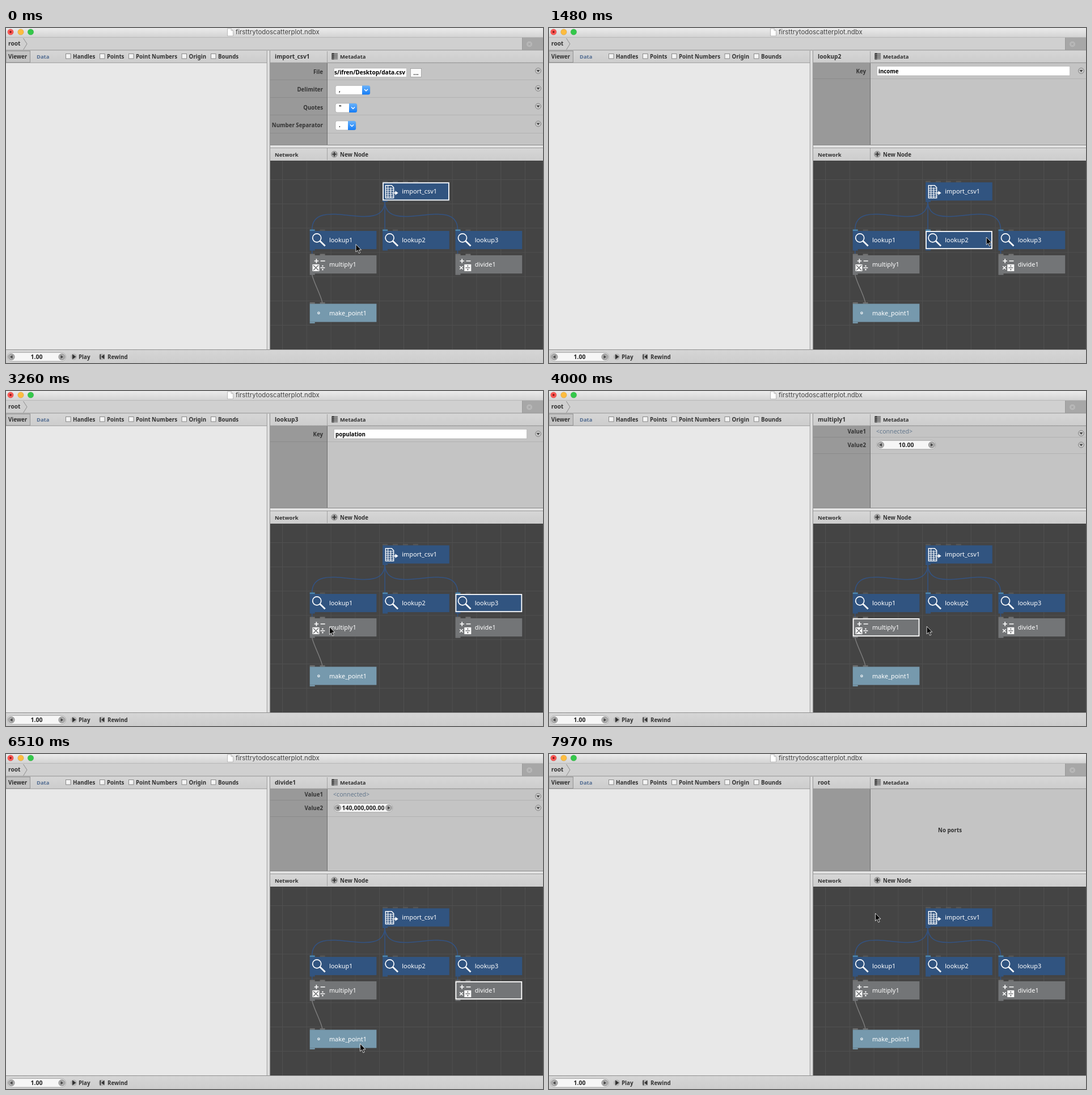
An HTML page for the animation above (8000 ms loop, 947 by 591 pixels).

```html
<!DOCTYPE html>
<html lang="en">
<head>
<meta charset="utf-8">
<title>Node editor</title>
<style>
html, body { margin: 0; width: 100%; height: 100%; overflow: hidden; background: #d0d0d0; }
svg { display: block; width: 947px; height: 591px; }
text { font-family: "Noto Sans", "Open Sans", sans-serif; white-space: pre; }
</style>
</head>
<body>
<svg id="stage" viewBox="0 0 947 591" xmlns="http://www.w3.org/2000/svg"></svg>
<script>
const LOOP = 8000;
const CELL = 42.8;
const NODE_W = 117.7;
const NODE_H = 32.1;

// Drawing helpers
const rect = (x, y, w, h, fill, extra = '') =>
  `<rect x="${x}" y="${y}" width="${w}" height="${h}" fill="${fill}" ${extra}/>`;
const line = (x1, y1, x2, y2, color, width = 1) =>
  `<path d="M${x1} ${y1}L${x2} ${y2}" stroke="${color}" stroke-width="${width}" fill="none"/>`;
const path = (d, fill, extra = '') => `<path d="${d}" fill="${fill}" ${extra}/>`;
const circle = (x, y, r, fill, extra = '') =>
  `<circle cx="${x}" cy="${y}" r="${r}" fill="${fill}" ${extra}/>`;
const stroke = (color, width) => `stroke="${color}" stroke-width="${width}"`;
const text = (x, y, value, { size = 9.7, fill = '#303030', weight = 600, anchor = 'start', extra = '' } = {}) => {
  const safe = value.replace(/</g, '&lt;').replace(/>/g, '&gt;');
  return `<text x="${x}" y="${y}" font-size="${size}" font-weight="${weight}" fill="${fill}" text-anchor="${anchor}" ${extra}>${safe}</text>`;
};
const gradient = (id, top, bottom) =>
  `<linearGradient id="${id}" x2="0" y2="1"><stop stop-color="${top}"/><stop offset="1" stop-color="${bottom}"/></linearGradient>`;

// Nodes sit on a grid, three cells apart per column
const column = i => 535.7 + i * 3 * CELL;
const BLUE = '#315480', GRAY = '#737577', TEAL = '#4d86ac', DIM = '#555', PALE = '#707070';
const nodes = {
  import_csv1: { x: column(1), y: 272.3, color: BLUE, icon: 'table', inputs: [DIM, DIM, DIM, DIM] },
  lookup1: { x: column(0), y: 358, color: BLUE, icon: 'lens', inputs: [TEAL, DIM] },
  lookup2: { x: column(1), y: 358, color: BLUE, icon: 'lens', inputs: [TEAL, DIM] },
  lookup3: { x: column(2), y: 358, color: BLUE, icon: 'lens', inputs: [TEAL, DIM] },
  multiply1: { x: column(0), y: 401, color: GRAY, icon: 'times', inputs: [PALE, PALE] },
  divide1: { x: column(2), y: 401, color: GRAY, icon: 'over', inputs: [PALE, PALE] },
  make_point1: { x: column(0), y: 486.5, color: '#7699ad', icon: 'dot', inputs: [PALE, PALE] }
};

// Icons are relative to the node's top left corner
const plusMinus = path('M8 10H15.500M11.700 6.200V13.800M19 10H27', 'none', stroke('#fff', 1.7));
const divide = (x, y, color) => line(x - 4, y, x + 4, y, color, 1.5) +
  circle(x, y - 3.3, 1.2, color) + circle(x, y + 3.3, 1.2, color);
const cross = (x, y, r, color, width) =>
  path(`M${x - r} ${y - r}l${2 * r} ${2 * r}m0 ${-2 * r}l${-2 * r} ${2 * r}`, 'none', stroke(color, width));
const icons = {
  table: () => path('M5.300 5.500H16L19.500 9V27.500H5.300Z', 'none', stroke('#fff', 1.5)) +
    path('M5 10.500H19M5 14H19M5 17.500H19M5 21H19M5 24.500H19M9.500 5.500V27.500M14.300 9V27.500', 'none', stroke('#fff', 1.1)) +
    path('M17 17.500H22V14.500L28 18.700L22 23V20H17Z', '#fff', stroke(BLUE, .6)),
  lens: () => circle(12.5, 12.3, 7.5, 'none', stroke('#fff', 1.7)) +
    path('M18 17.800L27 26.500', 'none', stroke('#fff', 2.8)),
  times: color => plusMinus + rect(4.8, 16, 12, 12, '#fff') + cross(10.8, 22, 4.5, color, 1.6) + divide(22.7, 22, '#fff'),
  over: color => plusMinus + cross(10.5, 22, 2.8, '#fff', 1.5) + rect(15.8, 16, 12, 12, '#fff') + divide(21.8, 22, color),
  dot: () => circle(15.7, 16.2, 1.7, 'none', stroke('#fff', 1.1))
};

function drawNode([name, n]) {
  const inputs = n.inputs.map((color, i) => rect(i * 17.9, -2.6, 9, 2.6, color)).join('');
  return `<g transform="translate(${n.x} ${n.y})">${inputs}` +
    rect(0, NODE_H, 9, 2.5, n.color) + rect(0, 0, NODE_W, NODE_H, n.color) +
    icons[n.icon](n.color) +
    text(34.2, 20, name, { size: 10.9, weight: 400, fill: '#fff' }) + '</g>';
}

function link(x1, y1, x2, y2, color) {
  const bend = Math.abs(x2 - x1) / 2;
  return path(`M${x1} ${y1}C${x1} ${y1 + bend} ${x2} ${y2 - bend} ${x2} ${y2}`, 'none', stroke(color, 1.5));
}

function drawNetwork() {
  const blue = '#335383';
  let grid = '';
  for (let i = 0; i < 11; i++) grid += line(487.5 + i * CELL, 235, 487.5 + i * CELL, 567, '#505050');
  for (let i = 0; i < 7; i++) grid += line(466, 267.5 + i * CELL, 947, 267.5 + i * CELL, '#505050');
  return rect(466, 234, 481, 333, '#444') + grid +
    [0, 1, 2].map(i => link(column(1) + 4, 305, column(i) + 4, 356, blue)).join('') +
    [0, 2].map(i => link(column(i) + 4, 392, column(i) + 4, 400, blue)).join('') +
    link(column(0) + 4, 434, column(0) + 22, 485, '#7c7c7c') +
    Object.entries(nodes).map(drawNode).join('');
}

const pill = (x, y, w, value) => rect(x, y, w, 15.5, '#f6f6f6', `rx="7.7" ${stroke('#999', .8)}`) +
  [[x + 7, 1], [x + w - 7, -1]].map(([cx, dir]) => circle(cx, y + 7.7, 5.6, '#acacac', stroke('#858585', .8)) +
    path(`M${cx - 2.5 * dir} ${y + 7.7}l${4.5 * dir} -3v6z`, '#444')).join('') +
  text(x + w / 2, y + 11.4, value, { size: 10.5, anchor: 'middle', fill: '#222' });

const checkbox = ([x, label]) => rect(x + .5, 45.5, 8.5, 8.5, '#f4f4f4', stroke('#8a8a8a', 1)) +
  text(x + 13, 53.5, label);

function drawChrome() {
  const lights = [[8, '#fc5753'], [26, '#fdbc40'], [43.5, '#34c84a']];
  return rect(0, 0, 947, 591, '#d0d0d0') + rect(0, 0, 947, 17, 'url(#title)') +
    lights.map(([x, c]) => circle(x, 7, 5.3, c, 'stroke="#000" stroke-opacity=".15" stroke-width=".7"')).join('') +
    circle(8, 7, 1.8, '#7b1512') +
    path('M390.500 1H397L400.500 4.500V14H390.500Z', '#fff', stroke('#aaa', .8)) + path('M397 1V4.500H400.500', 'none', stroke('#aaa', .8)) +
    text(405, 11.3, 'firsttrytodoscatterplot.ndbx', { size: 11.4, weight: 400, fill: '#444', extra: 'style="font-family:Inter,Roboto,sans-serif"' }) +
    line(0, 16.5, 947, 16.5, '#b8b8b8') +
    rect(0, 17, 947, 22, '#d0d0d0') + text(4, 31.3, 'root', { size: 10.2 }) +
    path('M30.500 18L37 28L30.500 38.500', 'none', stroke('#8d8d8d', 1)) +
    rect(910, 17, 37, 22, '#a7a7a7') + line(910.5, 17, 910.5, 39, '#999') +
    circle(923, 28.5, 5, '#b8b8b8') + cross(923, 28.5, 1.8, '#a5a5a5', 1.3) +
    line(0, 39, 947, 39, '#959595') +
    rect(0, 40, 460, 21, 'url(#bar)') + rect(0, 40.5, 42.5, 20, '#c4c4c4', stroke('#939393', 1)) +
    text(4, 53.5, 'Viewer') + text(54, 53.5, 'Data', { size: 9.4, fill: '#526c91' }) +
    [[105, 'Handles'], [165, 'Points'], [216, 'Point Numbers'], [309.5, 'Origin'], [361, 'Bounds']].map(checkbox).join('') +
    line(0, 61.3, 460, 61.3, '#a0a0a0') + rect(0, 62, 460, 505, '#e8e8e8') +
    rect(460, 40, 6, 527, '#e0e0e0') + line(460.3, 40, 460.3, 567, '#9a9a9a') + line(465.3, 40, 465.3, 567, '#8a8a8a') +
    rect(466, 40, 481, 21, 'url(#bar)') + line(566.5, 41, 566.5, 61, '#a2a2a2') +
    rect(574.5, 44.5, 10.5, 11, '#777') + rect(574.5, 44.5, 4, 11, '#333') +
    path('M575 47.500H585M575 51H585M575 54H585', 'none', stroke('#c5c5c5', .8)) + text(589, 53.5, 'Metadata', { size: 9.4 }) +
    line(466, 61.3, 947, 61.3, '#8c8c8c') +
    rect(466, 62, 100, 144, '#999') + rect(567, 62, 380, 144, '#c4c4c4') + line(566.5, 62, 566.5, 206, '#6e6e6e') +
    rect(466, 206, 481, 6, '#e2e2e2') + line(466, 206.5, 947, 206.5, '#8a8a8a') + line(466, 211.5, 947, 211.5, '#9a9a9a') +
    rect(466, 212, 481, 22, 'url(#bar)') + text(474, 226.5, 'Network', { size: 9.5 }) + line(566.5, 212, 566.5, 233, '#a2a2a2') +
    circle(579, 222.7, 5.5, '#a2a2a2', stroke('#8a8a8a', .7)) + path('M575.300 222.700H582.700M579 219V226.400', 'none', stroke('#333', 1.8)) +
    text(589, 226.5, 'New Node') + drawNetwork() +
    rect(0, 567, 947, 24, 'url(#bar)') + line(0, 567.5, 947, 567.5, '#8e8e8e') +
    pill(2.5, 572.5, 103, '1.00') +
    circle(119.5, 580, 5.5, '#b4b4b4') + path('M117 575.500V584.500L123.500 580Z', '#333') + text(128, 584, 'Play') +
    circle(169, 580, 5.5, '#b4b4b4') + rect(165.5, 575.5, 1.7, 9, '#333') + path('M173.500 575.500V584.500L168 580Z', '#333') + text(179, 584, 'Rewind');
}

// Parameter panel pieces
const label = (y, value) => text(559, y + 3.5, value, { anchor: 'end', fill: '#333' });
const rule = y => line(466, y + .5, 566, y + .5, '#8b8b8b') + line(567, y + .5, 947, y + .5, '#b2b2b2');
const menu = y => circle(938.5, y, 4.9, '#c9c9c9', stroke('#777', .9)) + path(`M935.500 ${y - 1.5}h6l-3 4z`, '#444');
const field = (x, y, w, h) => rect(x, y, w, h, '#fff', stroke('#aaa', .6));
const connected = (y, name) => label(y, name) + menu(y + 3.5) +
  text(577, y + 4, '<connected>', { size: 10.6, weight: 400, fill: '#66798e' });
const number = (y, name, value) => label(y + .5, name) + menu(y) + pill(578, y - 7.7, 104, value);

function combo(y, name, value, w) {
  const right = 581 + w;
  return label(y - 1, name) + menu(y - 3) + rect(581, y - 8, w, 16, '#fff', `rx="3" ${stroke('#aaa', .7)}`) +
    path(`M${right - 14} ${y - 8}h11q3 0 3 3v10q0 3 -3 3h-11z`, 'url(#blue)') +
    path(`M${right - 10} ${y - 1.5}l3 3l3 -3`, 'none', stroke('#fff', 1.5)) +
    text(587, y + 3.2, value, { fill: '#111' });
}

const lookup = key => label(76, 'Key') + field(578.5, 67.5, 340, 16.5) +
  text(581, 79.5, key, { fill: '#000' }) + menu(75.5) + rule(89);
const arithmetic = value => connected(71, 'Value1') + rule(81) + number(95, 'Value2', value) + rule(110);

const panels = {
  import_csv1: () => label(77, 'File') + field(578.5, 71, 128, 15.5) +
    text(704, 82, 's/ifren/Desktop/data.csv', { size: 10.1, anchor: 'end', fill: '#000', extra: 'clip-path="url(#fileClip)"' }) +
    rect(713.5, 71.5, 19, 15, '#fafafa', stroke('#999', .8)) + text(723, 82.5, '...', { size: 11, anchor: 'middle' }) +
    menu(75.5) + combo(109.5, 'Delimiter', ',', 61) + combo(141, 'Quotes', '"', 38) +
    combo(172, 'Number Separator', '.', 36) + [91, 122, 153, 185].map(rule).join(''),
  lookup1: () => lookup('health'),
  lookup2: () => lookup('income'),
  lookup3: () => lookup('population'),
  multiply1: () => arithmetic('10.00'),
  divide1: () => arithmetic('140,000,000.00'),
  make_point1: () => number(76, 'X', '0.00') + rule(91) + connected(101, 'Y') + rule(110),
  root: () => text(707, 137.5, 'No ports', { anchor: 'middle' })
};

const selections = [
  [0, 'import_csv1'], [140, 'lookup1'], [1040, 'lookup2'], [2070, 'lookup3'],
  [3410, 'multiply1'], [5030, 'divide1'], [6650, 'make_point1'], [7970, 'root']
];

// Pointer moves in discrete steps; "via" bends the path
const home = [617, 381.5];
const moves = [
  { start: 290, end: 890, steps: 5, to: [706, 372] },
  { start: 1330, end: 1770, steps: 4, to: [836.5, 366] },
  { start: 2370, end: 3260, steps: 7, to: [570.5, 416] },
  { start: 3700, end: 4730, steps: 8, to: [873, 413.5] },
  { start: 5470, end: 6510, steps: 8, to: [624.5, 511], via: [650, 556] },
  { start: 7100, end: 7840, steps: 6, to: [575.5, 281] }
];

function pointerAt(t) {
  let from = home;
  for (const { start, end, steps, to, via } of moves) {
    if (t < start) break;
    const gap = (end - start) / (steps - 1);
    const k = Math.min(1, (Math.floor((t - start + 4) / gap) + 1) / steps);
    const s = k * k * (3 - 2 * k);
    const origin = from;
    from = to.map((goal, i) => {
      const mid = via ? via[i] : (origin[i] + goal) / 2;
      return (1 - s) ** 2 * origin[i] + 2 * s * (1 - s) * mid + s * s * goal;
    });
  }
  return from;
}

const stage = document.getElementById('stage');
stage.innerHTML = '<defs>' + gradient('title', '#ebebeb', '#d2d2d2') + gradient('bar', '#d6d6d6', '#cdcdcd') +
  gradient('blue', '#69b2fa', '#147cf6') +
  '<clipPath id="fileClip"><rect x="579" y="71" width="127" height="16"/></clipPath></defs>' +
  drawChrome() + '<g id="panel"></g><g id="frame"></g><g id="pointer">' +
  path('M0 0V13.500L3.100 10.700L5.400 16L7.600 15L5.300 9.900H9.500Z', '#000', 'stroke="#fff" stroke-width=".8" stroke-linejoin="round"') + '</g>';
const [panel, frame, pointer] = ['panel', 'frame', 'pointer'].map(id => document.getElementById(id));
let shown;

function select(name) {
  if (name === shown) return;
  shown = name;
  panel.innerHTML = text(474, 53.5, name, { size: 10.3 }) + panels[name]();
  const n = nodes[name];
  frame.innerHTML = n ? rect(n.x + .9, n.y + .9, NODE_W - 1.8, NODE_H - 1.8, 'none', stroke('#fff', 1.8)) : '';
}

function render(t) {
  select(selections.filter(([start]) => t >= start).pop()[1]);
  pointer.setAttribute('transform', `translate(${pointerAt(t).map(v => v.toFixed(2)).join(' ')})`);
}

const began = performance.now();
function tick() {
  render((performance.now() - began) % LOOP);
  requestAnimationFrame(tick);
}
tick();
</script>
</body>
</html>
```
